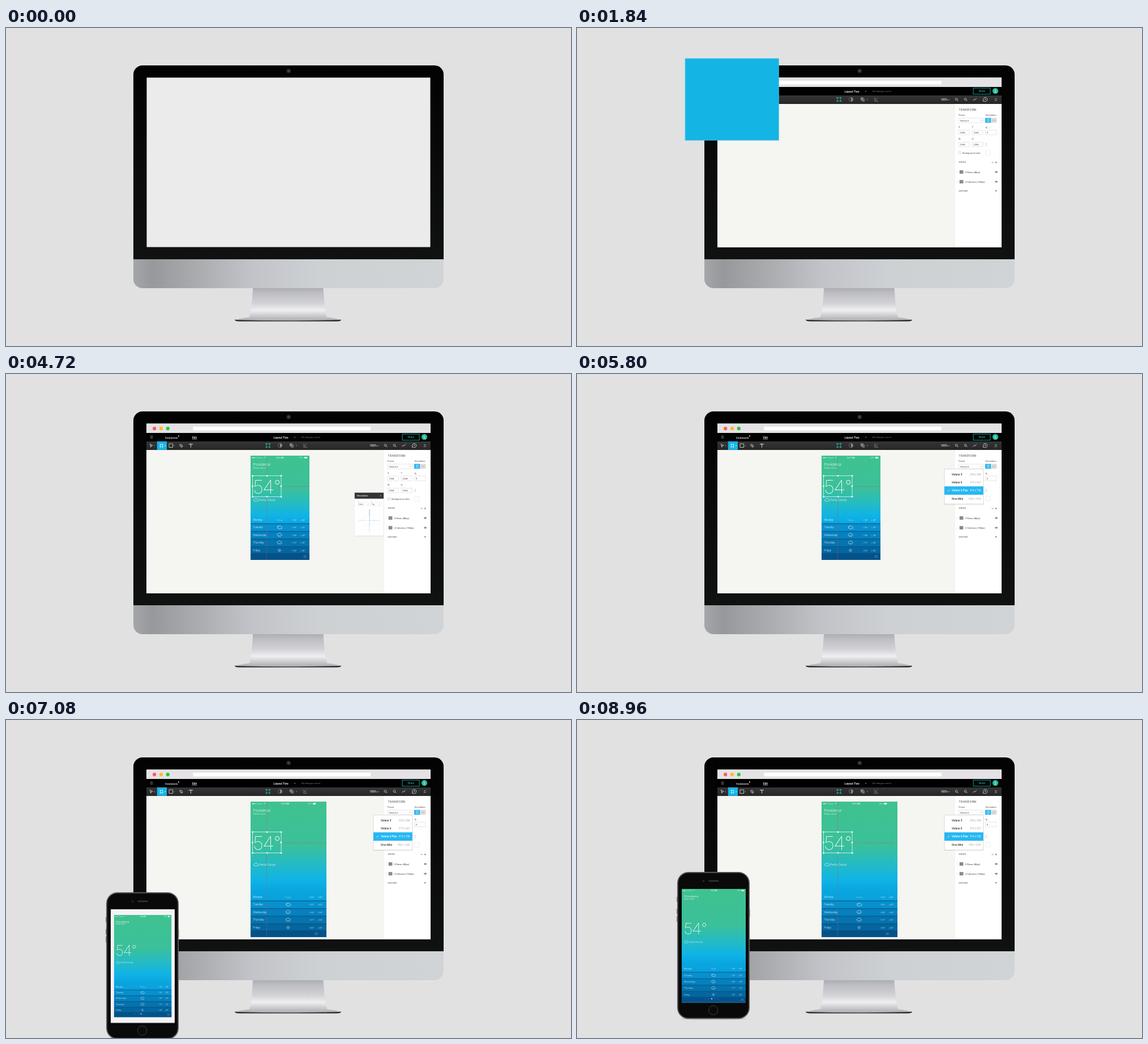
An HTML page for the animation above (9 s loop, 998 px wide and 561 px high).

```html
<!DOCTYPE html>
<html lang="en">
<head>
<meta charset="utf-8">
<title>Design editor</title>
<style>
@property --p { syntax: "<number>"; inherits: true; initial-value: 0; }
html, body { margin: 0; width: 998px; height: 561px; overflow: hidden; background: #e1e1e1; }
#stage { position: relative; width: 998px; height: 561px; overflow: hidden; font-family: Roboto, sans-serif; }
svg { position: absolute; left: 0; top: 0; overflow: visible; }
text { white-space: pre; }
.anim { animation: 9s linear infinite both; }

#bars { animation-name: bars; }
#side { animation-name: side; }
#zoom { animation-name: zoom; transform-origin: 273.7px 126px; }
#constraints { animation-name: constraints; transform-origin: 667px 209px; }
#links { animation-name: links; }
#menu { animation-name: menu; transform-origin: 684px 168px; }
#pick { animation-name: pick; }
#phone { animation-name: phone; }

/* --p runs from the small preset (0) to the large one (1) */
.board {
  position: absolute; overflow: hidden;
  width: calc(103.5px + 30.5px * var(--p)); height: calc(184px + 55px * var(--p));
  background: linear-gradient(#3fc28f 0%, #3bc09a 32%, #25bbc4 46%, #0fb3e6 58%, #0aa5df 66%, #0592d0 100%);
}
.move { transform: translate(calc(var(--x, 0) * 30.5px * var(--p)), calc(var(--y, 0) * 55px * var(--p))); }
.time { --x: .3; }
.batt { --x: .5; }
.more { --x: .65; --y: 1; }
#canvasBoard { left: 431.5px; top: 144px; animation-name: boardIn, grow; animation-duration: 9s; }
.guide { position: absolute; --y: .33; opacity: .75; }
.v { left: 28px; width: .8px; background: repeating-linear-gradient(#b5585a 0 2px, transparent 2px 4px); }
.h { left: 54.5px; top: 54px; height: .8px; background: repeating-linear-gradient(90deg, #b5585a 0 2px, transparent 2px 4px); }
.up { top: -25px; height: 60px; animation-name: show; }
.down { top: 73px; animation-name: down; }
.right { animation-name: right; }

#app { position: absolute; left: 185px; top: 298px; width: 113px; height: 200.5px; animation-name: fit; }
#app .board { --p: 1; transform: scale(.843, .839); transform-origin: 0 0; }
#app .time { --x: .5; }
#app .batt, #app .more { --x: 1; }
#app .temp { transform: translate(0, 28px); }

@keyframes bars {
  0%, 1% { transform: translateY(-47px); opacity: 0; animation-timing-function: ease-out; }
  6%, 100% { transform: none; opacity: 1; }
}
@keyframes side {
  0%, 4% { transform: translateX(82px); animation-timing-function: ease-out; }
  9%, 100% { transform: none; }
}
@keyframes zoom {
  0%, 5.8% { transform: scale(.103); visibility: hidden; }
  5.9% { transform: scale(.103); visibility: visible; animation-timing-function: ease-out; }
  10.8% { transform: scale(1.13); animation-timing-function: ease-in-out; }
  13.6%, 20.5% { transform: scale(1); animation-timing-function: ease-in; }
  22.2% { transform: scale(.103); visibility: visible; }
  22.3%, 100% { transform: scale(.103); visibility: hidden; }
}
@keyframes boardIn {
  0%, 27% { transform: scale(0); animation-timing-function: cubic-bezier(.2, .7, .3, 1); }
  30.5%, 100% { transform: none; }
}
@keyframes constraints {
  0%, 29% { transform: scale(0); animation-timing-function: ease-out; }
  31.5%, 51.55% { transform: none; }
  54.4%, 100% { transform: scale(0); }
}
@keyframes show { 0%, 31% { opacity: 0; } 31.5%, 100% { opacity: .75; } }
@keyframes links { 0%, 37.3% { opacity: 0; } 40.9%, 100% { opacity: 1; } }
@keyframes down { 0%, 37.3% { height: 0; } 40.9%, 100% { height: 190px; } }
@keyframes right { 0%, 37.3% { width: 0; } 40.9%, 100% { width: 90px; } }
@keyframes menu {
  0%, 55.5% { transform: scaleY(0); animation-timing-function: ease-out; }
  58%, 100% { transform: none; }
}
@keyframes pick { 0%, 63% { opacity: 0; } 64%, 100% { opacity: 1; } }
@keyframes grow {
  0%, 68% { --p: 0; animation-timing-function: cubic-bezier(.5, 0, .7, .7); }
  72% { --p: .78; animation-timing-function: cubic-bezier(.2, .6, .4, 1); }
  75.5%, 100% { --p: 1; }
}
@keyframes phone {
  0%, 75.5% { transform: translateY(300px); animation-timing-function: cubic-bezier(.2, .7, .3, 1); }
  82.6%, 100% { transform: none; }
}
@keyframes fit {
  0%, 84% { transform: scale(.9); animation-timing-function: ease-in-out; }
  91%, 100% { transform: none; }
}
</style>
</head>
<body>
<div id="stage"></div>
<script>
const text = (x, y, size, str, more = '') => `<text x="${x}" y="${y}" font-size="${size}" ${more}>${str}</text>`;
const rect = (x, y, w, h, fill, more = '') => `<rect x="${x}" y="${y}" width="${w}" height="${h}" fill="${fill}" ${more}/>`;
const path = (d, stroke, w = .7, more = '') => `<path d="${d}" fill="none" stroke="${stroke}" stroke-width="${w}" ${more}/>`;
const dot = (x, y, r, fill, more = '') => `<circle cx="${x}" cy="${y}" r="${r}" fill="${fill}" ${more}/>`;
const field = (x, y, w, h, str, size = 4) =>
  rect(x, y, w, h, '#fff', 'stroke="#d4d4d4" stroke-width=".6"') + text(x + 2.5, y + h / 2 + 1.5, size, str, 'fill="#444"');
const caret = (x, y, c = '#999') => `<path d="M${x - 1.2} ${y - .6}h2.4l-1.2 1.5z" fill="${c}"/>`;
const svg = (body, w = 998, h = 561) => `<svg width="${w}" height="${h}" viewBox="0 0 ${w} ${h}">${body}</svg>`;
const moved = (x, y, body) => `<g class="move" style="--x:${x};--y:${y}">${body}</g>`;

const computer = `
<defs>
  <linearGradient id="bezel" x2="0" y2="1"><stop stop-color="#020202"/><stop offset="1" stop-color="#101211"/></linearGradient>
  <linearGradient id="chin"><stop stop-color="#a5a6a9"/><stop offset=".06" stop-color="#97989b"/>
    <stop offset=".38" stop-color="#c2c3c8"/><stop offset=".6" stop-color="#cdd1d4"/><stop offset="1" stop-color="#d1d4d6"/></linearGradient>
  <linearGradient id="stand" x2="0" y2="1"><stop stop-color="#adaeb3"/><stop offset=".15" stop-color="#bdbec3"/>
    <stop offset=".45" stop-color="#d0d0d5"/><stop offset=".68" stop-color="#efeff1"/><stop offset=".9" stop-color="#c0c1c5"/><stop offset="1" stop-color="#aaabae"/></linearGradient>
  <linearGradient id="tools" x2="0" y2="1"><stop stop-color="#363636"/><stop offset="1" stop-color="#262626"/></linearGradient>
  <clipPath id="screen"><rect x="248.5" y="87.5" width="501" height="299"/></clipPath>
</defs>
<path d="M404 514.5H592Q592 517.5 584 517.5H412Q404 517.5 404 514.5z" fill="#222"/>
<path d="M436 459H560.5C562 480 563 497 567 510Q582 512 592 515Q498 517.5 404 515Q415 512 430 510C434 495 435 478 436 459z" fill="url(#stand)"/>
<path d="M225 408V82a16 16 0 0 1 16-16H757a16 16 0 0 1 16 16V408z" fill="url(#bezel)"/>
<path d="M225 408H773V443a16 16 0 0 1-16 16H241a16 16 0 0 1-16-16z" fill="url(#chin)"/>
${dot(499.3, 75.8, 3.8, '#2b2b2b')}${dot(499.3, 75.8, 1.8, '#474747')}
${rect(248.5, 87.5, 501, 299, '#ebebeb')}`;

const bars = `
${rect(248, 87.5, 502, 16.5, '#e5e2e5')}
${dot(262.2, 96.2, 3.1, '#fb5d57')}${dot(274, 96.2, 3.1, '#fcbb25')}${dot(285.8, 96.2, 3.1, '#26c73d')}
${rect(330.5, 93, 313.5, 6.5, '#fff')}
${rect(248, 104, 502, 15, '#000')}
${path('M254.5 109.3h5M254.5 111.3h5M254.5 113.3h5', '#999')}
<g fill="#fff">
${text(281, 113.7, 4.4, 'Comments', 'font-weight="700" letter-spacing=".15"')}${dot(305, 109.5, 1, '#fff')}
${text(329, 113.7, 4.7, 'Edit', 'font-weight="500"')}${rect(328.5, 114.8, 9, .6, '#ccc')}
${text(472.5, 113.5, 5.1, 'Layout Two', 'font-weight="500"')}${caret(510, 111.5, '#bbb')}
${text(522, 113.2, 4.2, 'All changes saved', 'fill="#777" font-style="italic"')}
${rect(700, 106, 30, 10.8, 'none', 'stroke="#1db3a8" stroke-width=".9"')}
${text(715, 113, 4.6, 'Share', 'text-anchor="middle" fill="#38b8c8"')}
${dot(739, 111, 5.2, '#1fb89a')}${text(739, 113.5, 6.5, 'S', 'text-anchor="middle"')}
</g>
${rect(248, 119, 502, 15, 'url(#tools)')}
${rect(266.8, 118.8, 17.2, 15, '#16b4e6')}
${path('M254.5 123.5l4.5 2.6-2.4.6-.8 2.4zM288 123h6.5v6.5h-6.5zM307 124l3 .3 2 3-1.5 2-3-2zM309 126l2.4 2.6', '#ddd', .8)}
${path('M271.6 124.2h6M271.6 128.6h6M272.6 123.2v6.4M276.6 123.2v6.4', '#fff')}
${path('M323.7 124.8v-1.2h5.6v1.2M326.5 123.6v6', '#eee', .9)}
${caret(262, 126.5)}${caret(281, 126.5, '#fff')}${caret(297, 126.5)}
${path('M460 123.3h5.5v5.5h-5.5z', '#26a69a', .9)}
${[459.6, 465.9].map(x => [122.9, 129.2].map(y => rect(x - .9, y - .9, 1.8, 1.8, '#35c4b0')).join('')).join('')}
${dot(484, 126, 3.6, 'none', 'stroke="#777" stroke-width=".8"')}<path d="M484 122.4a3.6 3.6 0 0 1 0 7.2z" fill="#888"/>
${rect(501, 122.5, 5, 5, '#888')}${rect(503.2, 124.7, 5, 5, '#707070')}${caret(513, 126.3)}
${path('M525 123.5l6.5 6M531.5 122.5l-6 6.5M526 122.5v7h6', '#777', .8)}
${text(642.5, 128.2, 5, '100%', 'fill="#eee" font-weight="500"')}${caret(657, 126.5, '#ddd')}
${[670, 686].map(x => dot(x, 125.6, 1.9, 'none', 'stroke="#ccc" stroke-width=".8"') + path(`M${x + 1.4} 127l2 2`, '#ccc', .9)).join('')}
${path('M699.5 128.5l2-3 1.8 1.5 2.2-3.5', '#ccc', .8)}
${path('M721 122.4a3.7 3.7 0 1 1-2.6 6.3l-1.2.8.6-2.2a3.7 3.7 0 0 1 3.2-4.9M721 124v2.6h1.2', '#ddd', .8)}
${path('M738 126l1.8-1.8 1.8 1.8M738 128.8l1.8-1.8 1.8 1.8', '#ddd', .8)}`;

const eye = y => path(`M738 ${y}q2.6-3 5.2 0q-2.6 3-5.2 0z`, '#555', .6) + dot(740.6, y, .9, '#555');
const gridRow = (y, str) => path(`M671 ${y - 2.5}v5`, '#ccc', .6, 'stroke-dasharray="1 1"')
  + [676, 678.3, 680.6].map(x => rect(x, y - 3, 1.5, 6, '#555')).join('') + text(686, y + 1.5, 4.1, str, 'fill="#333"') + eye(y);
const side = `
${rect(668, 134, 82, 253, '#fff')}
<g fill="#444">
${text(674.5, 146.4, 4.7, 'TRANSFORM', 'letter-spacing=".35"')}
${text(674, 155, 3.9, 'Preset')}${text(721.5, 155, 3.9, 'Orientation')}
${field(674, 159, 43.5, 8, 'Velano 6', 4.1)}${caret(714, 163)}
${rect(721, 158.6, 10.3, 8.6, '#29b6f0')}${rect(731.3, 158.6, 10.2, 8.6, '#dcdcdc')}
${path('M724.8 160.7h2.8v4.4h-2.8z', '#fff', .6)}${path('M734 163h4.5', '#aaa', .8)}
${text(674, 176.3, 3.8, 'X')}${text(697.5, 176.3, 3.8, 'Y')}${path('M722.5 173.5v3h2.6M722.5 174.5l1.8 2', '#555', .5)}
${field(674, 180, 19, 8.2, '2244')}${field(698, 180, 19, 8.2, '2244')}${field(721.3, 180, 19.7, 8.2, '0')}
${text(674, 197.3, 3.8, 'W')}${text(697.5, 197.3, 3.8, 'H')}
${field(674, 201.2, 19, 8.2, '2244')}${field(698, 201.2, 19, 8.2, '2244')}
${path('M721.5 203.5h1.5v4h-1.5', '#aaa', .6)}
${rect(674, 218, 4, 4, '#fff', 'stroke="#bbb" stroke-width=".6"')}${text(681, 221.5, 4.1, 'Background color')}
${rect(721.5, 216, 8, 8, '#fff', 'stroke="#e4e4e4" stroke-width=".6"')}
${text(674.5, 238, 4, 'GRIDS', 'letter-spacing=".3"')}${path('M732.5 237.2h3M738.8 237.2h3M740.3 235.7v3', '#555')}
${gridRow(254, '5 Rows (48px)')}${gridRow(271.2, '3 Columns (120px)')}
${text(674.5, 289, 4, 'EXPORT', 'letter-spacing=".3"')}${path('M738.8 287.2h3M740.3 285.7v3', '#555')}
</g>`;

const cloud = (x, y) => path(`M${x - 2.7} ${y + 2}h5.2a1.5 1.5 0 0 0 0-3.2a2.4 2.4 0 0 0-4.5-.5a1.9 1.9 0 0 0-.7 3.7z`, '#fff', .55);
const icons = [
  (x, y) => text(x, y + 1.5, 4.4, 'Today', 'text-anchor="middle" opacity=".6"'),
  (x, y) => cloud(x + .6, y + .4) + path(`M${x - 3.5} ${y}a2 2 0 0 1 2.3-2.5`, '#fff', .5),
  (x, y) => cloud(x, y - .5) + path(`M${x - 1.5} ${y + 2.3}v1M${x} ${y + 2.3}v1M${x + 1.5} ${y + 2.3}v1`, '#fff', .5),
  (x, y) => cloud(x, y - .5) + path(`M${x - 1.5} ${y + 2.3}v1M${x + 1.5} ${y + 2.3}v1`, '#fff', .5),
  (x, y) => dot(x, y, 1.5, 'none', 'stroke="#fff" stroke-width=".5"') + dot(x, y, 2.7, 'none', 'stroke="#fff" stroke-width=".7" stroke-dasharray=".6 1.52"')
];
const days = [['Monday', 54, 40], ['Tuesday', 56, 42], ['Wednesday', 58, 44], ['Thursday', 57, 43], ['Friday', 60, 46]];
const shades = ['#0890cd', '#0681bd', '#0573ad', '#05659e', '#04528a'];
const edges = [119.5, 133, 146.5, 160, 172.5];

const forecast = days.map(([day, hi, lo], i) => {
  const y = 113 + i * 13.55;
  return text(4.5, y + 1.7, 4.7, day)
    + moved(.5, 0, icons[i](51, y))
    + moved(1, 0, text(72.5, y + 1.6, 4.2, `↑ ${hi}°`) + text(87.5, y + 1.6, 4.2, `↓ ${lo}°`));
}).join('');

function board(id, selected) {
  const handles = [3.5, 29, 54].flatMap(x => [35.5, 54, 72.5].map(y =>
    x === 29 && y === 54 ? '' : rect(x - 1.3, y - 1.3, 2.6, 2.6, '#fff', 'stroke="#6cc" stroke-width=".3"'))).join('');
  const frame = selected ? rect(3.5, 35.5, 50.5, 37, 'none', 'stroke="#fff" stroke-width=".7"') + handles : '';
  const guides = selected ? ['v up', 'v down', 'h right'].map(c => `<i class="guide move anim ${c}"></i>`).join('') : '';
  const pages = selected ? '' : [0, 1, 2, 3, 4].map(i => dot(50 + i * 6.5, 231, i === 2 ? 1.2 : .7, '#fff', `opacity="${i === 2 ? 1 : .4}"`)).join('');
  return `<div class="board${selected ? ' anim' : ''}" id="${id}">${svg(`<g fill="#fff" font-weight="300">
    ${[0, 1, 2, 3, 4].map(i => dot(3.2 + i * 1.7, 3.7, .6, i < 3 ? '#fff' : 'none', 'stroke="#fff" stroke-width=".25"')).join('')}
    ${text(12, 5, 3.6, 'Carrin')}${path('M24 3q1.5-1.3 3 0M24.7 4q.8-.7 1.6 0', '#fff', .5)}
    <g class="move time">${text(52, 5, 3.7, '9:41 AM', 'text-anchor="middle" font-weight="400"')}</g>
    <g class="move batt">${text(86, 5, 3.6, '53%')}${rect(95, 2.4, 4.5, 2.5, '#fff')}${rect(100, 3.1, .6, 1.1, '#fff')}</g>
    ${text(4.5, 18.4, 6.3, 'Providence')}${text(4.5, 23.2, 3.9, 'Rhode Island')}
    <g class="move temp" style="--y:.33">${text(3.5, 67, 34, '54°', 'font-weight="100"')}${frame}</g>
    ${moved(0, .6, cloud(9.5, 78.3) + text(15.3, 80, 5, 'Partly Cloudy'))}
    ${moved(0, 1, edges.map((y, i) => rect(0, y, 135, 20, shades[i]) + rect(0, y, 135, 1.4, '#045184', 'opacity=".65"')).join('') + forecast)}
    <g class="move more">${path('M93.5 176.3h5.5M93.5 178h5.5M93.5 179.7h5.5', '#fff', .5, 'opacity=".45"')}</g>${pages}</g>`, 134, 239)}${guides}</div>`;
}

const constraints = `<g id="constraints" class="anim">
${rect(592.5, 211, 75, 111.5, '#000', 'opacity=".08"')}
${rect(592, 209.5, 75, 111.5, '#fff', 'stroke="#ddd" stroke-width=".5"')}${rect(592, 209.5, 75, 15.5, '#353535')}
${text(598, 219, 4, 'Edit constraints', 'fill="#fff" font-weight="500"')}${path('M658 216l2.4 2.4M660.4 216l-2.4 2.4', '#fff')}
${text(600.5, 232, 3.7, 'X', 'fill="#555"')}${text(634, 232, 3.7, 'Y', 'fill="#555"')}
${field(600, 235, 29.5, 9, 'Center', 3.9)}${caret(626, 239.5)}${field(634, 235, 26, 9, 'Top', 3.9)}${caret(656, 239.5)}
${rect(601, 252, 56, 57, 'none', 'stroke="#e6e6e6" stroke-width=".5" stroke-dasharray="1 1"')}
${rect(617.5, 269.5, 26, 24, 'none', 'stroke="#d2d2d2" stroke-width=".5" stroke-dasharray="1 1"')}
${path('M630.5 269v23M618 281.5h25', '#ccc', .6)}${path('M630.5 253v15.5', '#4cc3dc', 1)}
<g id="links" class="anim">${path('M630.5 253v57M602 281.5h16M639 281.5h17', '#8fb4e6', .9, 'stroke-dasharray="2 1"')}</g></g>`;

const option = (y, name, size, c1 = '#333', c2 = '#aaa') =>
  text(662, y + 1.7, 4.7, name, `fill="${c1}" font-weight="500"`) + text(713.5, y + 1.7, 4.5, size, `fill="${c2}" text-anchor="end"`);
const menu = `<g id="menu" class="anim">
${rect(649, 168.5, 69, 62, '#000', 'opacity=".1"')}${rect(649, 167.8, 68.8, 61.4, '#fff', 'stroke="#ccc" stroke-width=".7"')}
${option(176.8, 'Velano 5', '320 x 568')}${option(191, 'Velano 6', '375 x 667')}
${option(205.5, 'Velano 6 Plus', '414 x 736')}${option(220, 'Orvo Mini', '768 x 1024')}
<g id="pick" class="anim">${rect(649, 198.2, 68.8, 14.8, '#27b7f2')}${path('M654.3 205.6l1.3 1.3 2.3-3', '#fff')}
${option(205.5, 'Velano 6 Plus', '414 x 736', '#fff', '#fff')}</g></g>`;

const phone = `<div id="phone" class="anim" style="position:absolute;left:0;top:0">${svg(`
<ellipse cx="241" cy="527" rx="58" ry="1.6" fill="#000" opacity=".2"/>
${rect(176, 312, 2, 9, '#777')}${rect(176, 333, 2, 9, '#777')}${rect(176, 346, 2, 10, '#777')}${rect(304, 333, 1.5, 14, '#777')}
${rect(177.7, 268.7, 126.6, 258, '#090909', 'rx="19" stroke="#6a6c70" stroke-width="1.5"')}
${rect(179.3, 270.3, 123.4, 254.8, 'none', 'rx="17.5" stroke="#222" stroke-width="1"')}
${dot(223.5, 284, 2, '#20242c')}${rect(232.5, 282.8, 18, 2.4, '#353535', 'rx="1.2"')}
${rect(185, 298, 113, 200.5, '#f4f2f5')}
${dot(240.7, 512, 8.2, '#0b0b0b', 'stroke="#3c3c3c" stroke-width="1"')}`)}
<div id="app" class="anim">${board('phoneBoard', false)}</div></div>`;

document.getElementById('stage').innerHTML =
  svg(`${computer}<g clip-path="url(#screen)"><g id="bars" class="anim">${rect(248, 134, 420, 300, '#f5f5f1')}${bars}</g><g id="side" class="anim">${side}</g></g>`)
  + board('canvasBoard', true)
  + svg(`${constraints}${menu}<g id="zoom" class="anim">${rect(191.2, 54, 165, 144, '#14b4e5', 'stroke="#3bbfe9" stroke-width="1"')}</g>`)
  + phone;
</script>
</body>
</html>
```
